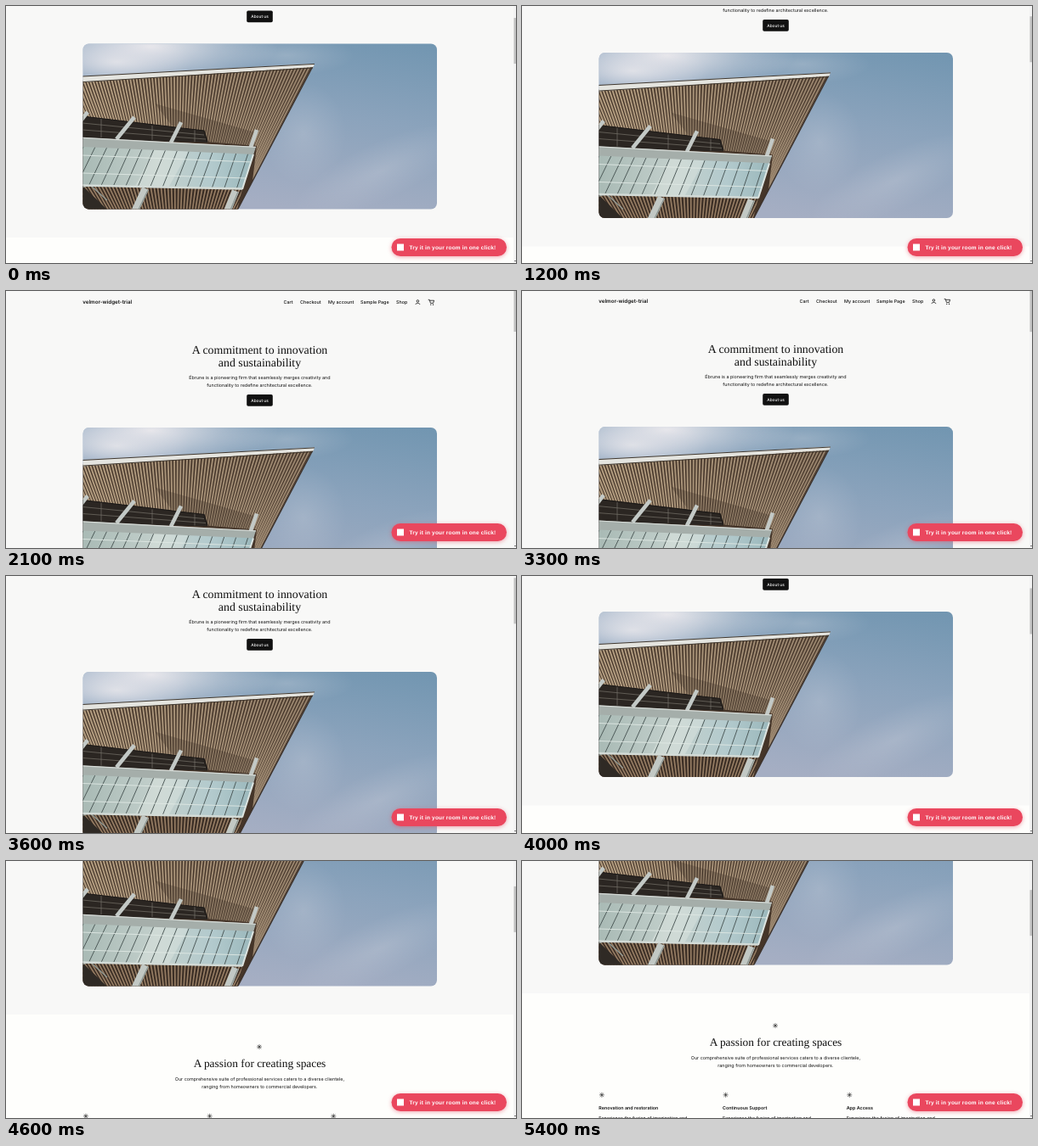
An HTML page that plays this animation: 600x303 px, repeating every 5800 ms.

```html
<!DOCTYPE html>
<html lang="en">
<head>
<meta charset="utf-8">
<title>Page scroll</title>
<style>
html, body { margin: 0; width: 100%; height: 100%; overflow: hidden; background: #fefefc; }
svg { display: block; width: 100%; height: 100%; }
text { font-family: Inter, sans-serif; font-size: 5.4px; fill: #111; text-rendering: geometricPrecision; }
.mid { text-anchor: middle; }
.nav { font-weight: 500; }
.bold { font-weight: 600; }
.title { font-family: "Liberation Serif", serif; font-size: 13.85px; }
.line { fill: none; stroke: #111; stroke-width: .8; }
.pill { font: bold 6.5px "Liberation Sans", sans-serif; letter-spacing: .16px; fill: #fff; }
</style>
</head>
<body>
<svg viewBox="0 0 600 303">
  <defs>
    <linearGradient id="sky" x1=".95" y1="0" x2=".6" y2="1">
      <stop offset="0" stop-color="#7296b1"/>
      <stop offset=".45" stop-color="#8ba3bc"/>
      <stop offset="1" stop-color="#a5aec3"/>
    </linearGradient>
    <linearGradient id="glass">
      <stop offset="0" stop-color="#a9bab5"/>
      <stop offset=".45" stop-color="#c3d0cc"/>
      <stop offset=".75" stop-color="#b3cacd"/>
      <stop offset="1" stop-color="#9bb8bc"/>
    </linearGradient>
    <linearGradient id="wood" gradientUnits="userSpaceOnUse" x1="90" x2="360">
      <stop offset="0" stop-color="#b39d80"/>
      <stop offset="1" stop-color="#94806a"/>
    </linearGradient>
    <radialGradient id="cloud">
      <stop offset="0" stop-color="#e9e8ec"/>
      <stop offset="1" stop-color="#dcdde6" stop-opacity="0"/>
    </radialGradient>
    <filter id="glow" x="-10%" y="-60%" width="120%" height="220%"><feGaussianBlur stdDeviation="2.6"/></filter>
    <clipPath id="frame"><rect x="90.5" y="44.5" width="416.5" height="195" rx="7"/></clipPath>
    <clipPath id="roof"><path d="M90 88L361 71L290 206L295 165L237 160L233 147L90 130Z"/></clipPath>
    <clipPath id="under"><path d="M90 212L278 216L272 240H90Z"/></clipPath>
    <clipPath id="panes"><path d="M90 166L291 175L278 216L90 212Z"/></clipPath>
    <path id="star" class="line" style="stroke-width:.55" d="M-3 0H3M0 -3V3M-2.2 -2.2L2.2 2.2M-2.2 2.2L2.2 -2.2"/>
  </defs>

  <g id="page">
    <rect y="-10" width="600" height="399.5" fill="#f8f8f7"/>
    <rect y="389.5" width="600" height="250" fill="#fefefc"/>

    <text class="bold" x="90.3" y="15.2" style="font-size:6.2px">velmor-widget-trial</text>
    <g class="nav">
      <text x="326.5" y="15.2">Cart</text>
      <text x="346" y="15.2">Checkout</text>
      <text x="379" y="15.2">My account</text>
      <text x="417" y="15.2">Sample Page</text>
      <text x="459" y="15.2">Shop</text>
    </g>
    <g class="line">
      <circle cx="484.4" cy="11.9" r="1.3"/>
      <path d="M481.9 16C482 13.8 486.8 13.8 486.9 16M496.7 10.3H498.2L499.4 14.3H502.6L503.6 11.2H498.6"/>
      <path d="M499.3 16.2H500.3M502 16.2H503" stroke-width="1.2"/>
    </g>

    <g class="mid">
      <text class="title" x="298.5" y="74">A commitment to innovation</text>
      <text class="title" x="298.5" y="89">and sustainability</text>
      <text x="298.4" y="104.2">Ébrune is a pioneering firm that seamlessly merges creativity and</text>
      <text x="298.4" y="112.9">functionality to redefine architectural excellence.</text>
      <rect x="283.2" y="122" width="30.6" height="13.7" rx="1.8" fill="#111"/>
      <text class="nav" x="298.5" y="130.6" style="font-size:4.8px;fill:#fff">About us</text>
    </g>

    <g transform="translate(0 116.5)"><g clip-path="url(#frame)">
      <rect x="90" y="44" width="418" height="196" fill="url(#sky)"/>
      <ellipse cx="170" cy="48" rx="150" ry="45" fill="url(#cloud)"/>
      <ellipse cx="130" cy="66" rx="90" ry="30" fill="url(#cloud)" opacity=".8"/>
      <ellipse cx="330" cy="58" rx="80" ry="24" fill="url(#cloud)" opacity=".25"/>
      <ellipse cx="350" cy="150" rx="50" ry="60" fill="url(#cloud)" opacity=".2"/>
      <ellipse cx="440" cy="195" rx="110" ry="34" fill="url(#cloud)" opacity=".2" transform="rotate(-25 440 195)"/>

      <path d="M90 88L361 70L272.5 240H90Z" fill="#453529"/>
      <path id="slats" clip-path="url(#roof)" fill="none" stroke="url(#wood)" stroke-width="2"/>
      <path d="M175 115L293 149V166L237 160L233 147L195 141Z" fill="#33261d" opacity=".25"/>
      <path d="M361 71L272.5 240" stroke="#3b312b" stroke-width="1.4"/>
      <path d="M90 83L363 68L361.5 72L90 90Z" fill="#e4e4df"/>
      <path d="M90 83L363 68.4M90 89.6L361 73" fill="none" stroke="#40382f" stroke-width="1"/>

      <path d="M90 130L233 147L237 161L90 157Z" fill="#2b2622"/>
      <path d="M90 138L233 152M90 146L235 157M112 133V155M172 141V158M222 146V160" fill="none" stroke="#77736b" stroke-width=".7"/>
      <path d="M90 130L233 147L237 160" fill="none" stroke="#1c1917" stroke-width="1.2"/>
      <g stroke="#c3c9c6" stroke-width="4.6">
        <path d="M96 125L86 138M151 131L130 157M206 137L194 161M295 146L287 169"/>
      </g>
      <path d="M90 155L294 166L291 176L90 167Z" fill="#a5aeaa"/>
      <path d="M90 155.4L294 166.4" stroke="#d6dbd7" stroke-width="1.2"/>

      <path d="M90 166L291 175L278 216L90 212Z" fill="url(#glass)"/>
      <g clip-path="url(#panes)">
        <path d="M175 168L215 171L190 216H150Z" fill="#e2e9e4" opacity=".4"/>
        <path id="bars" fill="none" stroke="#43504f" stroke-width=".9"/>
        <path d="M90 176L290 184M90 197L283 203" fill="none" stroke="#dfe8e4" stroke-width=".9"/>
      </g>
      <path d="M291 175L278 216" stroke="#dde5e2" stroke-width="2"/>

      <path d="M90 212L278 216L272 240H90Z" fill="#3a2d24"/>
      <path id="boards" clip-path="url(#under)" fill="none" stroke="#957c63" stroke-width="1.7"/>
      <path d="M90 212L119 240H90Z" fill="#2f2a25"/>
      <path d="M90 214L99 211L119 229" fill="none" stroke="#8f9994" stroke-width="1.2"/>
      <path d="M90 211.5L278 215.5" stroke="#d3dbd7" stroke-width="2.6"/>
      <g stroke="#c2c8c4" stroke-width="8.5"><path d="M164 215L151 243M270 218L260 243"/></g>
      <g stroke="#8f9894" stroke-width="1.4"><path d="M167 217L155 242M273 219L263 243"/></g>
    </g></g>

    <use href="#star" x="298" y="427.6"/>
    <g class="mid">
      <text class="title" x="298.5" y="451.2" style="font-size:13.35px">A passion for creating spaces</text>
      <text x="298.4" y="467.6">Our comprehensive suite of professional services caters to a diverse clientele,</text>
      <text x="298.4" y="476.1">ranging from homeowners to commercial developers.</text>
    </g>
    <g id="columns"></g>
  </g>

  <rect x="597" width="3" height="303" fill="#f3f3f3"/>
  <rect id="thumb" x="597.5" width="2.5" height="54" fill="#c1c1c1"/>
  <path d="M598 300H600L599 301.6Z" fill="#444"/>

  <rect x="453.5" y="275" width="135.5" height="21" rx="10.5" fill="#e0485f" opacity=".5" filter="url(#glow)"/>
  <rect x="453.5" y="274" width="135.5" height="21" rx="10.5" fill="#ea475e"/>
  <rect x="460" y="280.5" width="8" height="8" fill="#fff"/>
  <text class="pill" x="474.6" y="287">Try it in your room in one click!</text>
</svg>
<script>
const $ = id => document.getElementById(id);

// n strokes from x1..x2 at height y1 down to y2, all aimed at the vanishing point (vx, vy)
function fan(id, n, x1, x2, y1, y2, vx, vy) {
  let d = '';
  for (let i = 0; i < n; i++) {
    const x = x1 + (x2 - x1) * i / (n - 1);
    d += `M${x} ${y1}L${x + (vx - x) * (y2 - y1) / (vy - y1)} ${y2}`;
  }
  $(id).setAttribute('d', d);
}
fan('slats', 88, 20, 364, 66, 206, 200, 380);
fan('boards', 54, 70, 290, 210, 242, 200, 380);
fan('bars', 18, 92, 330, 164, 217, 654, -961);

$('columns').innerHTML = ['Renovation and restoration', 'Continuous Support', 'App Access'].map((name, i) => {
  const x = 90.3 + i * 145.7;
  return `<use href="#star" x="${x + 3.6}" y="509.3"/>
    <text class="bold" x="${x}" y="526.6">${name}</text>
    <text x="${x}" y="538.6">Experience the fusion of imagination and</text>`;
}).join('');

// [time in ms, scroll in px]; each wheel notch moves about 38.9 px
const keys = [
  [0, 116.5], [1100, 116.5], [1200, 106], [1300, 88], [1400, 77.8], [1500, 77.8],
  [1600, 70], [2000, 7], [2100, 0], [3200, 0], [3300, .9], [3400, 12], [3600, 48],
  [4000, 119], [4600, 208.5], [4700, 222], [4800, 231], [4900, 233.5], [5800, 233.5]
];

function scrollAt(t) {
  const i = keys.findIndex(k => k[0] > t);
  const [t0, a] = keys[i - 1], [t1, b] = keys[i];
  return a + (b - a) * (t - t0) / (t1 - t0);
}

function draw(now) {
  const y = scrollAt(Math.floor(now % 5800 / 100) * 100);
  $('page').setAttribute('transform', `translate(0 ${-y})`);
  $('thumb').setAttribute('y', y * .172 - 6);
  requestAnimationFrame(draw);
}
draw(performance.now());
</script>
</body>
</html>
```
